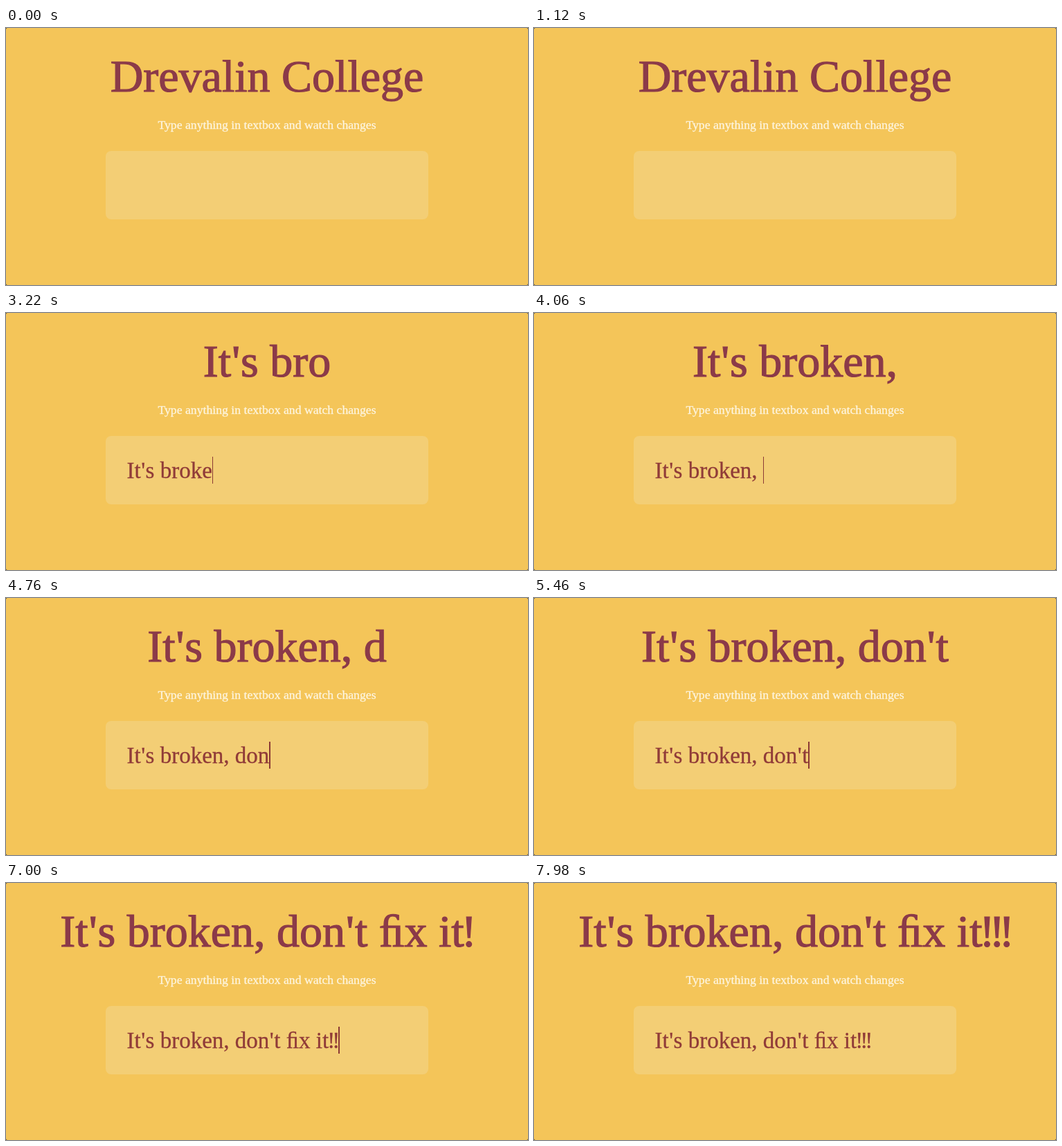
Write an HTML page that moves like this. It is 754x372 px and loops after 8.05 s.

```html
<!DOCTYPE html>
<html lang="en">
<meta charset="utf-8">
<title>Live heading</title>
<style>
  html, body { margin: 0; width: 100%; height: 100%; overflow: hidden; background: #33291a; }
  #stage {
    position: relative; width: 754px; height: 372px; overflow: hidden;
    border-radius: 2px; background: #f4c559;
    font-family: "Liberation Serif", "Times New Roman", serif;
  }
  #stage div { position: absolute; white-space: pre; }
  #title, #hint { left: 0; width: 100%; text-align: center; line-height: 0; }
  #title { top: 69.5px; font-size: 66px; color: #8b3a49; -webkit-text-stroke: 1.2px; }
  #hint { top: 140px; font-size: 17.7px; color: #fdf5e0; -webkit-text-stroke: .3px; }
  #box { left: 144px; top: 178px; width: 465.5px; height: 98.5px; border-radius: 8px; background: #f3ce75; }
  #field { left: 30.5px; top: 50px; font-size: 33px; line-height: 0; color: #903b38; -webkit-text-stroke: .3px; }
  #caret { position: absolute; top: -20px; width: 1.3px; height: 39px; background: #8b3a35; }
  .bang { margin: 0 -.06em; }
  .quote { margin: 0 .015em; }
</style>
<div id="stage">
  <div id="title"></div>
  <div id="hint">Type anything in textbox and watch changes</div>
  <div id="box"><div id="field"><span id="typed"></span><span id="caret"></span></div></div>
</div>
<script>
  const LOOP = 8050, LAG = 100, FOCUS = 350, BLINK = 500;
  const PLACEHOLDER = "Drevalin College";
  const TEXT = "It's broken, don't fix it!!!";
  // Key press times in ms, one per character of TEXT
  const KEYS = [
    1430, 1850, 2220, 2300, 2640, 2760, 2880, 3000, 3130, 3180,
    3410, 3690, 4050, 4330, 4690, 4740, 5020, 5310, 5580, 5720,
    5840, 5940, 6040, 6120, 6240, 6560, 6930, 7190
  ];

  const $ = id => document.getElementById(id);
  const textAt = t => TEXT.slice(0, KEYS.filter(k => k <= t).length);

  // Tightens exclamation marks, loosens apostrophes and joins "fi"
  const typeset = text => text
    .replace(/[!']/g, c => `<span class=${c === "!" ? "bang" : "quote"}>${c}</span>`)
    .replace("fi", "\ufb01");

  function setText(el, text) {
    if (el.dataset.text === text) return;
    el.dataset.text = text;
    el.innerHTML = typeset(text);
  }

  function draw(t) {
    setText($("title"), textAt(t - LAG).trimEnd() || PLACEHOLDER);
    setText($("typed"), textAt(t));
    const lastInput = Math.max(FOCUS, ...KEYS.filter(k => k <= t));
    const caretOn = t >= FOCUS && (t - lastInput) % (2 * BLINK) < BLINK;
    $("caret").style.visibility = caretOn ? "visible" : "hidden";
  }

  const start = performance.now();
  (function tick() {
    draw((performance.now() - start) % LOOP);
    requestAnimationFrame(tick);
  })();
</script>
</html>
```
